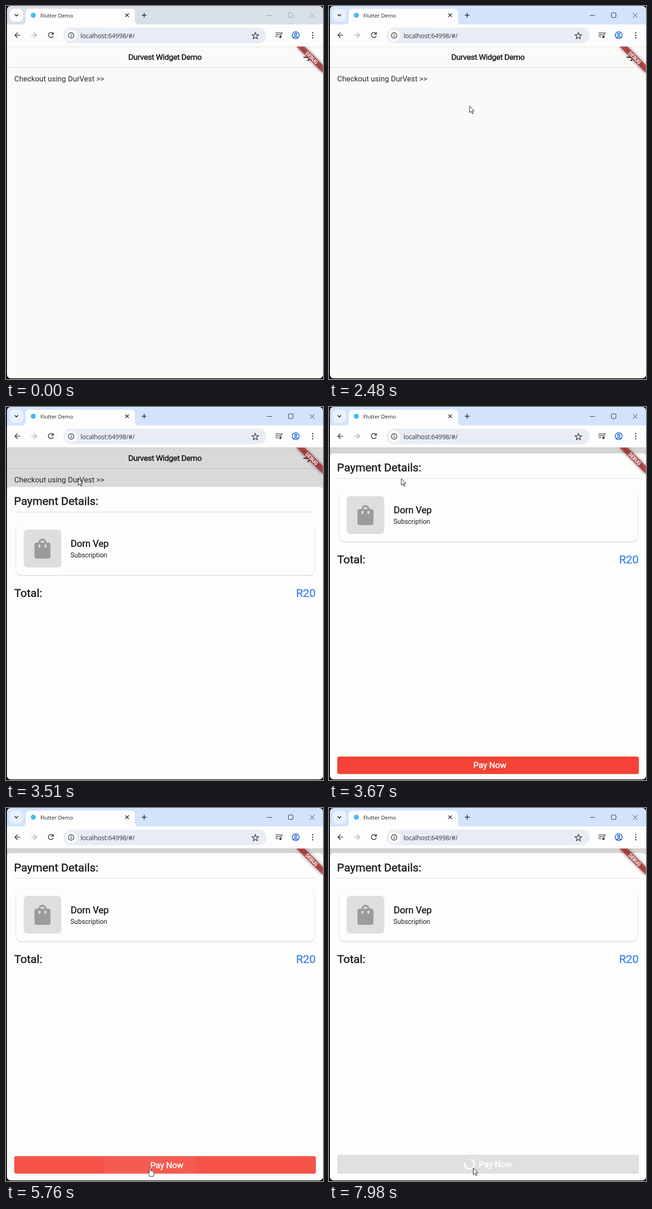
Animation, 691 px wide and 811 px high, one loop 8 s. Source, as an HTML page:

```html
<!DOCTYPE html>
<html lang="en">
<head>
<meta charset="utf-8">
<title>Checkout demo</title>
<style>
html, body { margin: 0; width: 100%; height: 100%; overflow: hidden; background: #000; }
svg { display: block; }
text { font-family: Roboto, sans-serif; fill: #1d1d1f; white-space: pre; }
.ui { font-family: "Open Sans", "Noto Sans", sans-serif; }
.bold { stroke: #1d1d1f; stroke-width: .55px; }
.white { fill: #fff; stroke: #fff; }
.line { fill: none; stroke: #3c4043; stroke-width: 1.7; }
</style>
</head>
<body>
<svg width="691" height="811" viewBox="0 0 691 811">
  <defs>
    <clipPath id="window"><rect x="2" y="0" width="689" height="809.5" rx="8"/></clipPath>
    <clipPath id="page"><rect x="2" y="88" width="689" height="722"/></clipPath>
    <clipPath id="buttonClip"><rect id="buttonClipBox" x="18" width="657.5" rx="4"/></clipPath>
    <filter id="soft" x="-30%" y="-30%" width="160%" height="160%"><feGaussianBlur stdDeviation="3.6"/></filter>
    <filter id="cardShadow" x="-5%" y="-10%" width="110%" height="125%">
      <feDropShadow dx="0" dy="1" stdDeviation=".8" flood-color="#000" flood-opacity=".27"/>
    </filter>
  </defs>

  <g clip-path="url(#window)">
    <!-- browser frame -->
    <rect id="strip" width="691" height="48"/>
    <rect id="tabSearch" x="8" y="6" width="29" height="28" rx="9"/>
    <path class="line" d="M19 18l3.7 3.7 3.7-3.7" style="stroke:#1f1f1f"/>
    <path d="M33 41q10 0 10-10V15q0-9 9-9H271q10 0 10 9V31q0 10 10 10z" fill="#fdfdfd"/>
    <rect y="40" width="691" height="48" fill="#fdfdfd"/>
    <circle cx="59.5" cy="20" r="5.5" fill="#46b8f4"/>
    <text class="ui" x="75" y="24.5" font-size="11.6">Flutter Demo</text>
    <path class="line" d="M260.2 16.2l7.6 7.6m0-7.6l-7.6 7.6M296 20h10.5m-5.25-5.25v10.5" style="stroke:#1f1f1f;stroke-width:1.5"/>
    <path id="controls" fill="none" d="M569 20.5h10.5M617.5 15h6q2 0 2 2v6q0 2-2 2h-6q-2 0-2-2v-6q0-2 2-2zM662.5 15.5l10 10m0-10l-10 10"/>
    <path class="line" d="M31 63.5H19.5m5.7-5.7l-5.7 5.7 5.7 5.7"/>
    <path class="line" d="M55 63.5h11.5m-5.7-5.7l5.7 5.7-5.7 5.7" style="stroke:#b0b2b5"/>
    <path class="line" d="M102.5 60.2A5.5 5.5 0 1 0 103 65M103.3 57v4.3H99"/>
    <rect x="125" y="47" width="443" height="34" rx="17" fill="#e8edf5"/>
    <circle cx="142" cy="64" r="12.5" fill="#fdfdfd"/>
    <circle class="line" cx="142" cy="64" r="6" style="stroke-width:1.5"/>
    <path class="line" d="M142 63.2v4.3M142 60.3v1.6"/>
    <text class="ui" x="162.5" y="69.5" font-size="14.2" letter-spacing="-.3" style="fill:#35383c">localhost:64998/#/</text>
    <path class="line" style="stroke-width:1.5" d="M543.5 57.5l2 4.7 5.1.5-3.9 3.4 1.2 5-4.4-2.7-4.4 2.7 1.2-5-3.9-3.4 5.1-.5z"/>
    <path class="line" d="M587.5 58.5h10m-10 4h10m-10 4h6M599.5 68v-9.5h4"/>
    <circle cx="598" cy="67.5" r="2.4" fill="#3c4043"/>
    <g class="line" style="stroke:#1a5fd0">
      <circle cx="631.5" cy="63.5" r="7.5"/><circle cx="631.5" cy="61.5" r="2.3"/>
      <path d="M626.3 69q5.2-4.5 10.4 0"/>
    </g>
    <g fill="#3c4043"><circle cx="668.5" cy="58" r="1.6"/><circle cx="668.5" cy="63.5" r="1.6"/><circle cx="668.5" cy="69" r="1.6"/></g>

    <!-- page -->
    <g clip-path="url(#page)">
      <rect y="87" width="691" height="724" fill="#fafaf8"/>
      <path d="M2 88.5H691" stroke="#e3e4dc"/>
      <path d="M2 133.5H691" stroke="#d3d3dc"/>
      <text class="bold" x="346.5" y="117" font-size="17.4" letter-spacing="-.42" text-anchor="middle">Durvest Widget Demo</text>
      <path class="line" d="M648.5 111.5H665m-7.5-8l8 8-8 8" style="stroke:#111;stroke-width:2.2"/>
      <text x="18" y="164" font-size="16.4" style="fill:#2e2e30">Checkout using DurVest &gt;&gt;</text>
      <rect id="barrier" y="87" width="691" height="724"/>

      <g id="sheet">
        <path d="M2 8q0-8 8-8H683q8 0 8 8V730H2z" fill="#fdfdfc"/>
        <text class="bold" x="17.5" y="39.5" font-size="24.6">Payment Details:</text>
        <path d="M18 54.5H675" stroke="#dcdcdc"/>
        <rect x="22" y="78" width="650" height="113.5" rx="12" fill="#fdfdfc" filter="url(#cardShadow)"/>
        <rect x="38.5" y="93" width="82" height="82" rx="8" fill="#dedede"/>
        <path transform="translate(53.3 108) scale(2.18)" fill="#9b9b9b" d="M18 6h-2a4 4 0 0 0-8 0H6a2 2 0 0 0-2 2v12a2 2 0 0 0 2 2h12a2 2 0 0 0 2-2V8a2 2 0 0 0-2-2zm-8 4a1 1 0 0 1-2 0V8h2zm2-6a2 2 0 0 1 2 2h-4a2 2 0 0 1 2-2zm4 6a1 1 0 0 1-2 0V8h2z"/>
        <text class="bold" x="141" y="130.5" font-size="20.4">Dorn Vep</text>
        <text x="140.5" y="153.5" font-size="14.34">Subscription</text>
        <text class="bold" x="18" y="239" font-size="24.6">Total:</text>
        <text class="bold" x="675" y="239" font-size="24.6" text-anchor="end" style="fill:#4389ee;stroke:#4389ee">R20</text>
        <rect id="button" x="18" width="657.5" rx="4"/>
        <g clip-path="url(#buttonClip)"><circle id="ripple" cx="314" cy="684" fill="#fff"/></g>
        <path id="spinner" fill="none" stroke="#fff" stroke-width="3"/>
        <text id="pay" class="bold white" font-size="18.43">Pay Now</text>
      </g>

      <path d="M633 88H650.5L691 128.5V146z" opacity=".5" filter="url(#soft)"/>
      <path d="M633 88H650.5L691 128.5V146z" fill="#b71c1c" opacity=".63"/>
      <text class="bold white" transform="translate(666.4 112.6) rotate(45)" y="3.7" font-size="10.4" text-anchor="middle">DEBUG</text>
    </g>
  </g>

  <g id="cursor" fill="#fff" stroke="#111" stroke-linejoin="round">
    <path id="arrow" d="M.5.5V15l3.4-3.2 2.5 5.5 2.2-1-2.5-5.3h4.5z"/>
    <path id="hand" d="M-1.5 10.5V1.5q0-1.5 1.5-1.5t1.5 1.5V7q2.3-1 2.7.6 2-.8 2.4.7 2-.5 2 1.3V13q0 2.5-1.5 4v2H-1.2v-1.5L-4.6 12.5q-1.2-2 .4-2.5 1-.3 2.7 1.8z"/>
  </g>
</svg>
<script>
const LOOP = 8000, SHEET_TOP = 98, OPEN = 3401, HOVER = 5114, PRESS = 5740, LOADING = 5900, SPIN = 5940;
const $ = id => document.getElementById(id);
const set = (id, attrs) => { for (const k in attrs) $(id).setAttribute(k, attrs[k]); };
const show = (id, on) => set(id, { visibility: on ? "visible" : "hidden" });
const clamp = v => Math.min(1, Math.max(0, v));
const mix = (a, b, p) => a + (b - a) * p;
const mixColor = (a, b, p) => `rgb(${a.map((v, i) => mix(v, b[i], p))})`;
const linear = p => p;
const easeOut = p => 1 - (1 - p) ** 3;
const smooth = p => p * p * (3 - 2 * p);

// Bezier (.4, 0, .2, 1), solved by bisection.
function fastOutSlowIn(x) {
  let lo = 0, hi = 1, s = .5;
  for (let i = 0; i < 20; i++) {
    s = (lo + hi) / 2;
    1.2 * (1 - s) ** 2 * s + .6 * (1 - s) * s * s + s ** 3 < x ? lo = s : hi = s;
  }
  return 3 * (1 - s) * s * s + s ** 3;
}

// Start, end, destination and easing of each pointer move.
const start = [676, 469];
const moves = [
  [1840, 1940, 567, 406, linear],
  [2130, 2280, 334, 240, easeOut],
  [2470, 2480, 306, 217, linear],
  [2480, 2960, 157, 155, smooth],
  [4020, 4080, 150, 168, linear],
  [4080, 4290, 244, 489, smooth],
  [4560, 5370, 325, 766, easeOut],
  [5380, 5450, 309, 786, linear],
  [5450, 5510, 314, 782, linear],
];

function pointerAt(t) {
  let [x, y] = start;
  for (const [from, to, nx, ny, ease] of moves) {
    if (t < from) break;
    const p = ease(clamp((t - from) / (to - from)));
    x = mix(x, nx, p);
    y = mix(y, ny, p);
  }
  return [x, y];
}

function spinnerPath(t) {
  const u = t / 1333 % 1;
  const head = fastOutSlowIn(clamp(u * 2)), tail = fastOutSlowIn(clamp(u * 2 - 1));
  const a = Math.PI * (-.5 + tail * 1.5 + t / 2222 * 2 + u * .5);
  const sweep = Math.max((head - tail) * 1.5 * Math.PI, .01);
  const point = v => `${306 + 10.5 * Math.cos(v)} ${676 + 10.5 * Math.sin(v)}`;
  return `M${point(a)}A10.5 10.5 0 ${+(sweep > Math.PI)} 1 ${point(a + sweep)}`;
}

function draw(t) {
  const active = t >= 1370;
  set("strip", { fill: active ? "#d3e3fc" : "#d9dfe7" });
  set("tabSearch", { fill: active ? "#e9f1fe" : "#fcfcfc" });
  set("controls", { stroke: active ? "#1f1f1f" : "#92969b" });

  const hidden = t < OPEN ? 1 : Math.exp(-(t - OPEN) / 49);
  show("sheet", t >= OPEN);
  set("sheet", { transform: `translate(0 ${SHEET_TOP + 715 * hidden})` });
  set("barrier", { opacity: .15 * (1 - hidden) });

  const loading = t >= LOADING;
  const box = { y: loading ? 656 : 659, height: loading ? 41 : 38 };
  const hover = mixColor([244, 67, 54], [246, 84, 72], clamp((t - HOVER) / 200));
  const gray = mixColor([246, 84, 72], [224, 224, 224], clamp((t - LOADING) / 200));
  set("button", { ...box, fill: loading ? gray : hover });
  set("buttonClipBox", box);
  set("pay", { x: loading ? 326.5 : 314.5, y: loading ? 682.5 : 684.5 });

  show("ripple", t >= PRESS && t < 6550);
  set("ripple", {
    r: mix(85, 400, clamp((t - PRESS) / 400)),
    opacity: .04 * (1 - clamp((t - 6000) / 550)),
  });
  show("spinner", loading);
  if (loading) set("spinner", { d: spinnerPath(Math.max(0, t - SPIN)) });

  const [x, y] = pointerAt(t);
  const overLink = t < OPEN && x < 215 && y < 172;
  const overButton = y > 757 && !loading;
  show("cursor", t >= 1840);
  set("cursor", { transform: `translate(${x} ${y})` });
  set("hand", { display: overLink || overButton ? "inline" : "none" });
  set("arrow", { display: overLink || overButton ? "none" : "inline" });
}

function tick() {
  draw(performance.now() % LOOP);
  requestAnimationFrame(tick);
}
tick();
</script>
</body>
</html>
```
